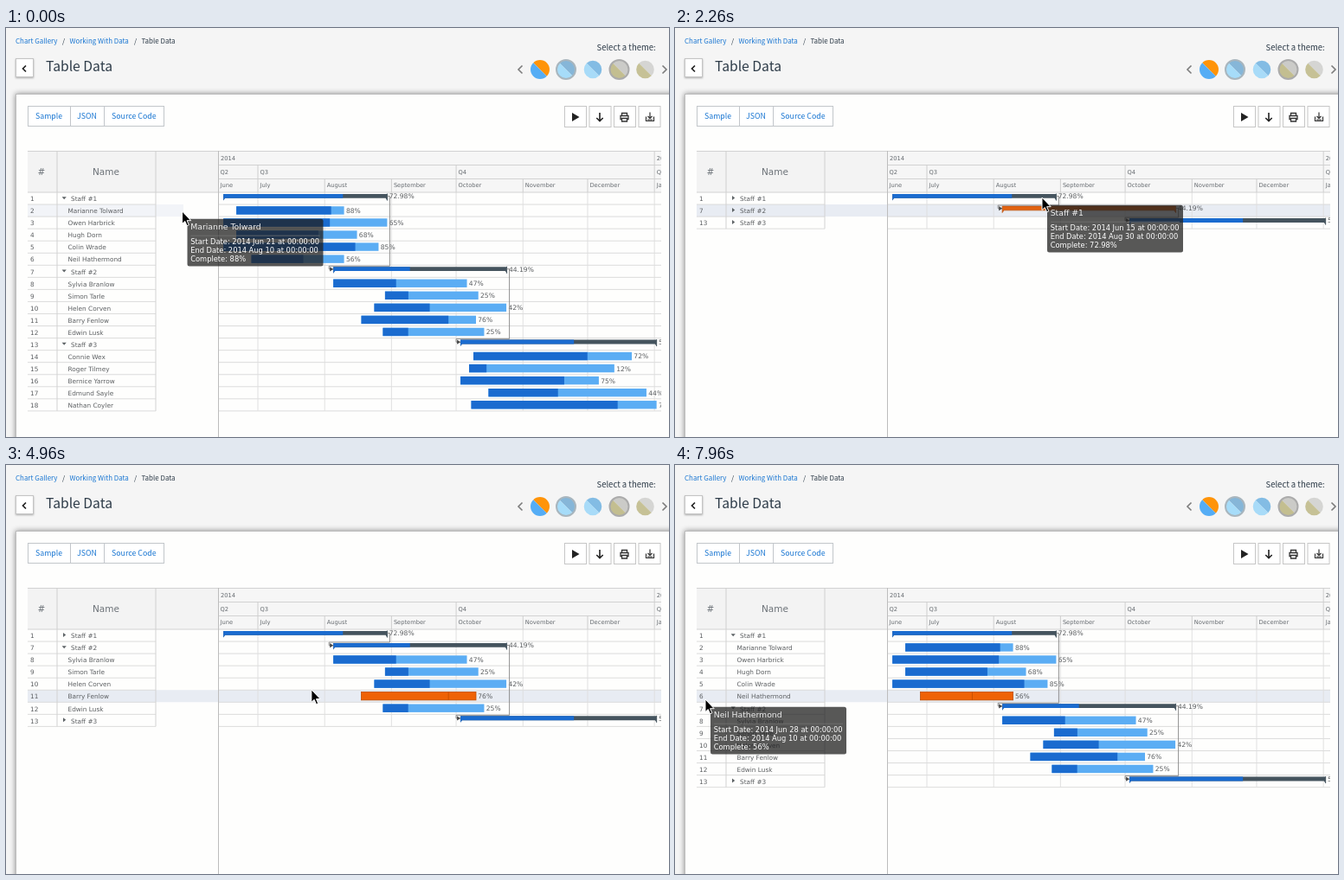
These frames come from a looping animation (766 px wide and 473 px high, 8000 ms). An HTML page:

```html
<!DOCTYPE html>
<html lang="en">
<head>
<meta charset="utf-8">
<title>Table Data</title>
<style>
html, body { margin: 0; width: 100%; height: 100%; overflow: hidden; background: #f5f5f5; }
svg { display: block; width: 100%; height: 100%; }
text { font-family: "DejaVu Sans", Verdana, sans-serif; font-size: 7.33px; fill: #5c5f62; white-space: pre; }
.ui { font-family: "Noto Sans CJK JP", "Noto Sans CJK SC", "Noto Sans", sans-serif; fill: #2d3b48; }
.crumb { font-size: 7.95px; }
.btn { font-size: 8.8px; }
.link { fill: #1976d2; }
.cal { font-size: 6.7px; fill: #666b70; }
.head { font-size: 10.5px; fill: #6c7278; text-anchor: middle; }
.pct { font-size: 7.6px; }
.tip { font-size: 8.3px; fill: #fff; }
.tip.title { font-size: 9.3px; fill: #f0f0f0; }
.card { fill: #fefefd; stroke: #bcbcbc; filter: drop-shadow(0 0 3px rgba(0,0,0,.45)); }
</style>
</head>
<body>
<svg viewBox="0 0 766 473" xmlns="http://www.w3.org/2000/svg">
  <defs><clipPath id="chart"><rect x="245" y="142" width="512" height="331"/></clipPath></defs>
  <g id="page"></g>
  <g id="live"></g>
  <g id="header"></g>
  <g id="over"></g>
</svg>
<script>
const LOOP = 8000, TOP = 190, ROW = 14.05, DAY = 2.49, JULY = 291;
const LEFT = 25, SPLIT = 245, RIGHT = 757;
const LIGHT = '#5badf4', BLUE = '#1a6bcf', DARK = '#45545e', HOT = '#ef6206';

// name, start and end in days from 1 July 2014, percent complete
const tasks = [
  ['Staff #1', -16, 60, 72.98], ['Marianne Tolward', -10, 40, 88], ['Owen Harbrick', -16, 60, 65],
  ['Hugh Dorn', -10, 46, 68], ['Colin Wrade', -16, 56, 85], ['Neil Hathermond', -3, 40, 56],
  ['Staff #2', 35, 115.5, 44.19], ['Sylvia Branlow', 35, 97, 47], ['Simon Tarle', 59, 102.3, 25],
  ['Helen Corven', 54, 115.3, 42], ['Barry Fenlow', 48, 101.2, 76], ['Edwin Lusk', 58, 105, 25],
  ['Staff #3', 94, 185, 57.86], ['Connie Wex', 100, 173.5, 72], ['Roger Tilmey', 98, 165.4, 12],
  ['Bernice Yarrow', 94, 158.2, 75], ['Edmund Sayle', 107, 180.3, 44], ['Nathan Coyler', 99, 185, 79]
].map(([name, from, to, pct], i) => ({
  name, from, to, pct, id: i + 1, group: Math.floor(i / 6), parent: i % 6 === 0,
  x0: dayX(from), x1: dayX(to)
}));

// spans during which each group is closed
const closed = [[400, 7500], [750, 2900], [1130, LOOP]];

// pointer path: time, x, y
const path = [
  [0, 204, 212], [150, 130, 206], [310, 67, 197], [480, 67, 197], [640, 66, 211], [830, 66, 211],
  [1000, 66, 224], [1530, 66, 224], [1680, 105, 222], [1850, 230, 219], [2050, 370, 213],
  [2230, 425, 206], [2260, 424, 196], [2400, 424, 196], [2530, 330, 204], [2700, 150, 210],
  [2820, 67, 211], [3030, 67, 211], [3150, 150, 225], [3300, 330, 256], [3460, 470, 277],
  [3510, 474, 283], [3560, 470, 268], [3700, 470, 268], [3900, 478, 252], [4150, 470, 232],
  [4350, 462, 254], [4500, 450, 267], [4680, 440, 278], [4800, 410, 277], [4960, 353, 260],
  [5130, 330, 232], [5360, 345, 215], [5700, 470, 209], [5950, 600, 194], [6130, 655, 183],
  [6330, 655, 183], [6500, 377, 121], [6660, 377, 121], [6850, 320, 166], [7000, 252, 192],
  [7100, 115, 199], [7250, 88, 201], [7400, 67, 197], [7560, 67, 197], [7700, 58, 222],
  [7860, 42, 262], [7960, 35, 271], [LOOP, 35, 271]
];

const $ = id => document.getElementById(id);
function dayX(d) { return JULY + d * DAY; }
const rect = (x, y, w, h, fill, more = '') =>
  `<rect x="${x}" y="${y}" width="${w}" height="${h}" fill="${fill}" ${more}/>`;
const line = (d, color, more = '') => `<path d="${d}" fill="none" stroke="${color}" ${more}/>`;
const shape = (d, fill, more = '') => `<path d="${d}" fill="${fill}" ${more}/>`;
const text = (x, y, s, cls = '') => `<text x="${x}" y="${y}" class="${cls}">${s}</text>`;

function pointer(t) {
  const k = Math.max(1, path.findIndex(p => p[0] >= t));
  const [t0, x0, y0] = path[k - 1], [t1, x1, y1] = path[k];
  const f = Math.max(0, (t - t0) / (t1 - t0));
  return { x: x0 + (x1 - x0) * f, y: y0 + (y1 - y0) * f };
}

function disc(x, r, upper, lower, ring) {
  const a = r * Math.SQRT1_2, c = 48;
  const half = (sweep, fill) =>
    shape(`M${x - a} ${c - a}A${r} ${r} 0 0 ${sweep} ${x + a} ${c + a}Z`, fill);
  return half(1, upper) + half(0, lower) +
    (ring ? `<circle cx="${x}" cy="${c}" r="${r}" fill="none" stroke="${ring}" stroke-width="2"/>` : '');
}

function drawPage() {
  const icons = [
    shape('M654 98L662.5 103L654 108Z', '#222'),
    line('M686 98V107.5M682.3 104L686 107.7L689.7 104', '#222', 'stroke-width="1.6"'),
    line('M711.5 101V98.5H717.5V101M711.5 105.5H710V101.5H719V105.5H717.5M711.5 104.5H717.5V108H711.5Z', '#333', 'stroke-width="1.3"'),
    line('M739.5 102.5V107.5H748.5V102.5M744 97.5V104M741.5 102L744 104.5L746.5 102M741 106H747', '#333', 'stroke-width="1.2"')
  ];
  $('page').innerHTML = rect(0, 0, 766, 473, '#f5f5f5') +
    text(11, 18, 'Chart Gallery', 'ui crumb link') + text(65, 18, '/', 'ui crumb') +
    text(73.5, 18, 'Working With Data', 'ui crumb link') + text(148, 18, '/', 'ui crumb') +
    text(156.5, 18, 'Table Data', 'ui crumb') +
    rect(11.5, 35.5, 20, 21, '#fff', 'stroke="#c4c4c4" style="filter:drop-shadow(0 1px 1px rgba(0,0,0,.3))"') +
    line('M23 43.5L19.5 47L23 50.5', '#222', 'stroke-width="1.7"') +
    `<text x="46" y="50" class="ui" style="font-size:15.7px">Table Data</text>` +
    `<text x="682.5" y="26" class="ui" style="font-size:9.5px">Select a theme:</text>` +
    line('M596.5 43.5L592 48L596.5 52.5M758.5 43.5L763 48L758.5 52.5', '#7d7d7d', 'stroke-width="1.6"') +
    disc(617, 11, '#ff9409', '#55adf5') + disc(647, 11, '#86b6d8', '#a6dcf9', '#a9b6be') +
    disc(678, 10.3, '#83bce4', '#a8dbf8') + disc(708.5, 11, '#cbcbc8', '#c3be90', '#ababab') +
    disc(738.5, 10.3, '#d5d5d3', '#c6c196') +
    `<rect class="card" x="11.5" y="76.5" width="800" height="450"/>` +
    rect(25.5, 90.5, 157, 23, '#fff', 'stroke="#c2c6ca"') + line('M74.5 90V114M113.5 90V114', '#c2c6ca') +
    text(34, 105.3, 'Sample', 'ui btn link') + text(82, 105.3, 'JSON', 'ui btn link') +
    text(122, 105.3, 'Source Code', 'ui btn link') +
    icons.map((icon, i) => rect(645.5 + i * 28.5, 90.5, 25, 24, '#fff', 'stroke="#c6c6c6"') + icon).join('');
}

function drawHeader() {
  const months = [-18, 0, 31, 62, 92, 123, 153, 184];
  const names = ['June', 'July', 'August', 'September', 'October', 'November', 'December', 'January'];
  const at = i => i ? dayX(months[i]) : SPLIT;
  let s = rect(LEFT, 142, SPLIT - LEFT, 48, '#f3f3f3') + rect(SPLIT, 142, RIGHT - SPLIT, 48, '#f6f6f6') +
    line('M25 142.5H757M245 158.5H757M245 174.5H757M25 190H757', '#d2d2d2') +
    line('M59 142V190M173 142V190', '#cfcfcf') + text(41, 169.5, '#', 'head') + text(115.5, 169.5, 'Name', 'head');
  s += '<g clip-path="url(#chart)">';
  names.forEach((n, i) => {
    const x = at(i);
    if (i) s += line(`M${x} ${i === 7 ? 142 : i % 3 === 1 ? 158 : 174}V190`, '#cfcfcf');
    s += text(x + 2.5, 184.3, n, 'cal');
  });
  s += [[0, 'Q2'], [1, 'Q3'], [4, 'Q4'], [7, 'Q1']].map(([i, q]) => text(at(i) + 2.5, 168.8, q, 'cal')).join('');
  s += text(248, 153, '2014', 'cal') + text(at(7) + 2.5, 153, '2015', 'cal') + '</g>';
  $('header').innerHTML = s + line('M245.5 142V473', '#bdbdbd');
}

function bar(task, y, hot) {
  const { x0, x1, pct, parent } = task, w = x1 - x0, done = w * pct / 100;
  let s;
  if (parent) {
    const top = y + 2;
    s = shape(`M${x0} ${top}H${x1}V${top + 7.5}L${x1 - 1.8} ${top + 4.8}H${x0 + 1.8}L${x0} ${top + 7.5}Z`,
      hot ? '#e2620f' : DARK, hot ? 'stroke="#b9500c" stroke-width=".7"' : '');
    s += hot ? line(`M${x0 + done} ${top}V${top + 4.8}`, '#b9500c', 'stroke-width=".8"')
      : shape(`M${x0} ${top}H${x0 + done}V${top + 4.8}H${x0 + 1.8}L${x0} ${top + 7.5}Z`, BLUE) +
        line(`M${x1} ${top - .5}V${top + 7.5}`, DARK);
  } else {
    const top = y + 2.2, h = 9.4;
    s = rect(x0, top, w, h, hot ? HOT : LIGHT, hot ? 'stroke="#c04e00" stroke-width=".8"' : '');
    s += hot ? line(`M${x0 + done} ${top}V${top + h}`, '#c04e00', 'stroke-width=".8"') : rect(x0, top, done, h, BLUE);
  }
  return s + text(x1 + 2.3, y + (parent ? 7.3 : 9.8), pct + '%', 'pct');
}

function link(a, b, ya, yb) {
  const ca = ya + 4.4, cb = yb + 4.6, x = a.x1 + 3, back = b.x0 - 5;
  return line(`M${a.x1} ${ca}H${x}V${yb + 1}H${back}V${cb}H${b.x0}`, '#858585', 'stroke-width=".9"') +
    shape(`M${b.x0 - 4} ${cb - 2.6}L${b.x0} ${cb}L${b.x0 - 4} ${cb + 2.6}Z`, '#4a4a4a');
}

function drawTable(rows, hover, faint) {
  const end = TOP + rows.length * ROW, yOf = i => TOP + i * ROW;
  let s = '', grid = '', bars = '';
  rows.forEach((r, i) => {
    const y = yOf(i), hot = r === hover && !faint;
    if (r === hover) s += rect(LEFT, y, (faint ? 205 : RIGHT) - LEFT, ROW, faint ? '#f2f4f8' : '#e8ecf3');
    grid += `M25 ${y + ROW}H173M245 ${y + ROW}H757`;
    bars += bar(r, y, hot);
  });
  const months = [0, 31, 62, 92, 123, 153, 184].map(d => `M${dayX(d)} 190V${end}`).join('');
  s += line(grid, '#d9d9d9', 'stroke-width=".9"') + line(months, '#dedede', 'stroke-width=".9"') +
    line(`M59 190V${end}M173 190V${end}`, '#d2d2d2');
  rows.forEach((r, i) => {
    const y = yOf(i), m = y + 6.8;
    s += text(28, y + 10.2, r.id) + text(r.parent ? 75 : 71.5, y + 10.2, r.name);
    if (r.parent) s += shape(rows[i + 1] && !rows[i + 1].parent
      ? `M64.6 ${m - 1.6}H69.8L67.2 ${m + 1.4}Z` : `M66 ${m - 2.8}L69.2 ${m - .3}L66 ${m + 2.2}Z`, '#5d6265');
  });
  const heads = rows.filter(r => r.parent);
  const links = [0, 1].map(k => link(heads[k], heads[k + 1],
    yOf(rows.indexOf(heads[k])), yOf(rows.indexOf(heads[k + 1])))).join('');
  $('live').innerHTML = s + `<g clip-path="url(#chart)">${bars}${links}</g>`;
}

function date(d) {
  const [, m, day] = new Date(Date.UTC(2014, 6, 1 + Math.floor(d))).toUTCString().match(/ (\w+) (\w+)/)
    ? [0, ...new Date(Date.UTC(2014, 6, 1 + Math.floor(d))).toUTCString().split(' ').slice(1, 3).reverse()] : [];
  return `2014 ${m} ${day} at 00:00:00`;
}

function tooltip(r, x, y) {
  return `<g transform="translate(${x + 6} ${y + 8.7})">` +
    rect(0, 0, 157, 54.8, '#212121', 'fill-opacity=".75" rx="2.5"') +
    text(3.7, 12.8, r.name, 'tip title') + line('M4 19.5H153', '#777', 'stroke-width=".7"') +
    text(3.7, 29.6, 'Start Date: ' + date(r.from), 'tip') +
    text(3.7, 39.6, 'End Date: ' + date(r.to), 'tip') +
    text(3.7, 49.6, `Complete: ${r.pct}%`, 'tip') + '</g>';
}

function cursor({ x, y }, hand) {
  const d = hand
    ? 'M-2 1C-2-1 1-1 1 1L2 6C2 4.5 4.5 4.5 4.5 6.5C5 5 7 5.5 7 7.5C8 6.5 9 7 9 9L8 13V16H0V14L-6 8.5C-7 6.5-4.5 6-3 7.5L-1 9Z'
    : 'M0 0V14.5L3.3 11.5L5.6 16.8L7.8 15.8L5.6 10.7H10.2Z';
  const knuckles = hand ? line('M2 6V8.5M4.5 7V9M7 8V9.5M2.5 11.5V14M5 11.5V14', '#000', 'stroke-width=".8"') : '';
  return `<g transform="translate(${x} ${y})">` +
    shape(d, hand ? '#fff' : '#000', `stroke="${hand ? '#000' : '#fff'}" stroke-width="1"`) + knuckles + '</g>';
}

function draw(t) {
  const rows = tasks.filter(r => r.parent || t < closed[r.group][0] || t >= closed[r.group][1]);
  const indexAt = p => Math.floor((p.y - TOP) / ROW);
  const p = pointer(t), i = indexAt(p), row = rows[i];
  const hand = !!row && row.parent && Math.abs(p.x - 67) < 6;
  const hover = hand ? null : rows[indexAt(pointer(Math.max(0, t - 40)))];
  const y = p.y - TOP - i * ROW;
  const overBar = row && p.x >= row.x0 && p.x <= row.x1 && y >= 2 && y <= (row.parent ? 10 : 12);
  const inGrid = p.x < SPLIT && pointer(Math.max(0, t - 100)).x < SPLIT;
  drawTable(rows, hover, t < 30);
  $('over').innerHTML = (row && !hand && (overBar || inGrid) ? tooltip(row, p.x, p.y) : '') + cursor(p, hand);
}

drawPage();
drawHeader();
const start = performance.now();
function tick() {
  draw((performance.now() - start) % LOOP);
  requestAnimationFrame(tick);
}
tick();
</script>
</body>
</html>
```
